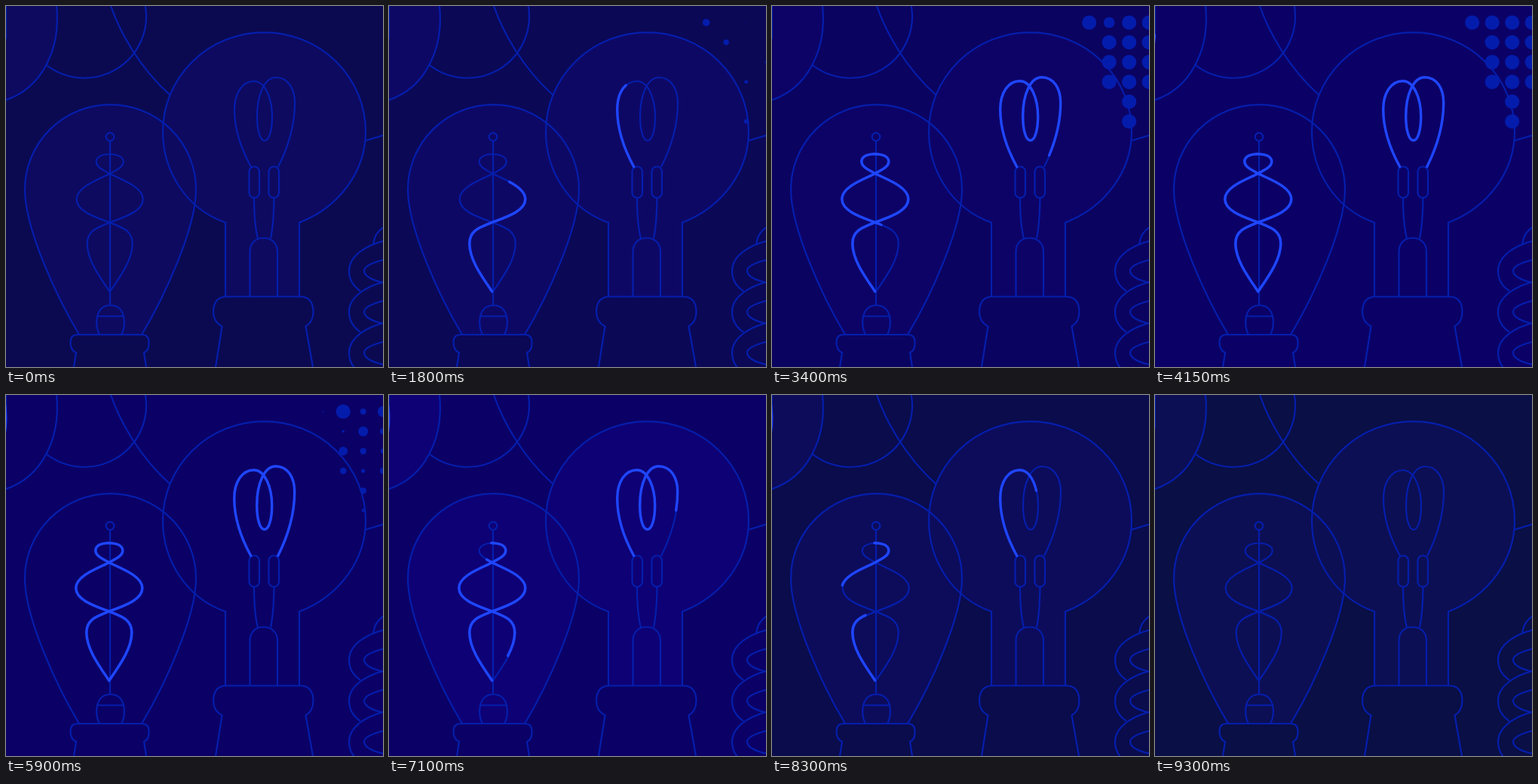
Write an HTML page that moves like this. It is 500x480 px and loops after 9800 ms.

```html
<!DOCTYPE html>
<html lang="en">
<head>
<meta charset="utf-8">
<title>Light bulbs</title>
<style>
  html, body { margin: 0; width: 100%; height: 100%; overflow: hidden; }
  svg { display: block; width: 100vw; height: 100vh; }
  .line { fill: none; stroke: #051eac; stroke-width: 2.2; }
  .lit { fill: none; stroke: #1f46ff; stroke-width: 3.4; stroke-linecap: round; }
  #dots { fill: #041cac; }
</style>
</head>
<body>
<svg viewBox="0 0 500 480">
  <defs>
    <g id="glass">
      <path d="M67 0C70 30 66 55 53 79C41 102 23 117 0 125L-9 128V0"/>
      <path d="M97 437C66 385 25 295 25 244A113.5 113 0 0 1 252 244C252 295 211 385 180 437"/>
      <path d="M291 386V288C240 270 208 221 208 167A134.5 132 0 0 1 477 167C477 219 443 267 389 288V386"/>
    </g>
    <path id="up" pathLength="1" d="M137 380C122 358 107 337 107 316C107 298 122 294 137 288C152 282 181 274 181 257C181 240 150 230 137 223C128 218 119 214 119 207C119 200 128 197 136 197"/>
    <path id="down" pathLength="1" d="M136 197C146 197 155 200 155 207C155 214 146 218 137 223C124 230 93 240 93 257C93 274 122 282 137 288C152 294 167 298 167 316C167 337 152 358 137 380"/>
    <path id="loop" pathLength="1" d="M325 214C313 192 303 165 303 138C303 115 314 100 329 100C344 100 353 124 353 147C353 165 349 179 343 179C337 179 333 165 333 147C333 118 343 95 358 95C374 95 383 110 383 129C383 160 373 190 361 214"/>
    <path id="edge" pathLength="1" d="M-1 48Q1 31 -1 14"/>
    <path id="coil" d="M502 312C478 318 455 332 455 352C455 365 461 373 470 379M502 337C486 341 475 346 475 352C475 359 486 365 502 368"/>
  </defs>
  <rect id="back" width="500" height="480"/>
  <use id="fill" href="#glass"/>
  <g id="dots"></g>
  <g class="line">
    <use href="#glass"/>
    <path d="M0 0V44"/>
    <path d="M53 78A82 82 0 0 0 184.800 0M139 0C150 32 175 80 217 118M477 179L500 172"/>
    <!-- left bulb -->
    <circle cx="138" cy="174" r="5.3"/>
    <path d="M138 179V398M124 437C117 425 118 398 138.500 398C159 398 160 425 153 437M120 412.500H157"/>
    <path d="M90 480L93 461C86 458 85.500 452 85.500 447Q85.500 437 95 437H180Q189.500 437 189.500 447C189.500 453 189 458 183 461L186 480"/>
    <g transform="translate(.7)"><use href="#up"/><use href="#down"/></g>
    <!-- right bulb -->
    <use href="#loop"/>
    <rect x="322.500" y="213.500" width="13.500" height="41.500" rx="6.500"/>
    <rect x="348.500" y="213.500" width="13.500" height="41.500" rx="6.500"/>
    <path d="M329 255Q329 290 334 309M355.500 255Q355 290 351 309"/>
    <path d="M323.500 386V327C323.500 315 331 308.500 341.500 308.500C352 308.500 360 315 360 327V386"/>
    <path d="M278 480L286.500 426C279 422 275 416 275 407Q275 386.500 293 386.500H390Q407.500 386.500 407.500 407C407.500 416 404 422 397.500 426L407 480"/>
    <!-- spiral lamp -->
    <path d="M487 317Q489 301 501 294"/>
    <use href="#coil"/><use href="#coil" y="54.500"/><use href="#coil" y="109"/>
  </g>
  <g id="lit" class="lit" transform="translate(-.3 -.3)"></g>
</svg>
<script>
const LOOP = 9800, STEP = 50;
const NS = 'http://www.w3.org/2000/svg';
const $ = id => document.getElementById(id);
const ramp = (t, a, b) => Math.min(1, Math.max(0, (t - a) / (b - a)));
const smooth = x => x * x * (3 - 2 * x);
const mix = (a, b, k) => a.map((v, i) => v + (b[i] - v) * k);
const rgb = c => `rgb(${c.map(Math.round)})`;

// Background: dusk warms up, then cools to night
const DUSK = [11, 10, 81], WARM = [11, 0, 102], NIGHT = [10, 15, 69];

function backColor(t) {
  const lit = mix(DUSK, WARM, ramp(t, 450, 4150) ** 1.5);
  return mix(lit, NIGHT, 1 - (1 - ramp(t, 7100, 9300)) ** 2);
}

// Glass is a little lighter than the background, except at full light
function glassColor(t, [r, g, b]) {
  const lift = 1 - ramp(t, 2650, 4150) + ramp(t, 6000, 7100);
  return [r + 3 * lift, g, b + 15 * lift];
}

// Even cells of the checkerboard spread from the corner, odd ones fill upwards
function dotStart(c, r) {
  return (c + r) % 2
    ? Math.max(1500, 2840 - 200 * c - 300 * r)
    : 1300 + 110 * Math.min(4.5, c * c + r * r - r);
}

const dots = [];
for (let r = 0; r < 6; r++) {
  for (let c = 0; c < 4; c++) {
    if (r > 3 ? c !== 2 : r > 0 && c === 0) continue;
    const el = document.createElementNS(NS, 'circle');
    el.setAttribute('cx', 420.7 + 26.5 * c);
    el.setAttribute('cy', 22 + 26.3 * r);
    dots.push({ el: $('dots').appendChild(el), start: dotStart(c, r) });
  }
}

function glow(id, from, until, ease = x => x) {
  const el = $(id).cloneNode();
  el.removeAttribute('id');
  $('lit').append(el);
  return t => {
    const part = ease(ramp(t, from, until)) - ramp(t, 6760, 9200);
    el.style.display = part > 0 ? '' : 'none';
    el.setAttribute('stroke-dasharray', `${part} 2`);
  };
}

const glows = [
  glow('up', 450, 2275),
  glow('down', 2275, 4100),
  glow('loop', 860, 3730, smooth),
  // the sliver at the left border goes out last
  (show => t => show(t < 8350 ? Math.min(t, 6760) : t))(glow('edge', 3950, 4700))
];

function draw(now) {
  const t = Math.floor(now % LOOP / STEP) * STEP;
  const back = backColor(t);
  $('back').setAttribute('fill', rgb(back));
  $('fill').setAttribute('fill', rgb(glassColor(t, back)));
  for (const { el, start } of dots) {
    const out = 5000 + (start - 1300) * 0.7;
    const size = ramp(t, start, start + 1000) - ramp(t, out, out + 1000);
    el.setAttribute('r', 9.6 * size);
  }
  for (const show of glows) show(t);
}

const begin = performance.now();
function frame() {
  draw(performance.now() - begin);
  requestAnimationFrame(frame);
}
frame();
</script>
</body>
</html>
```
